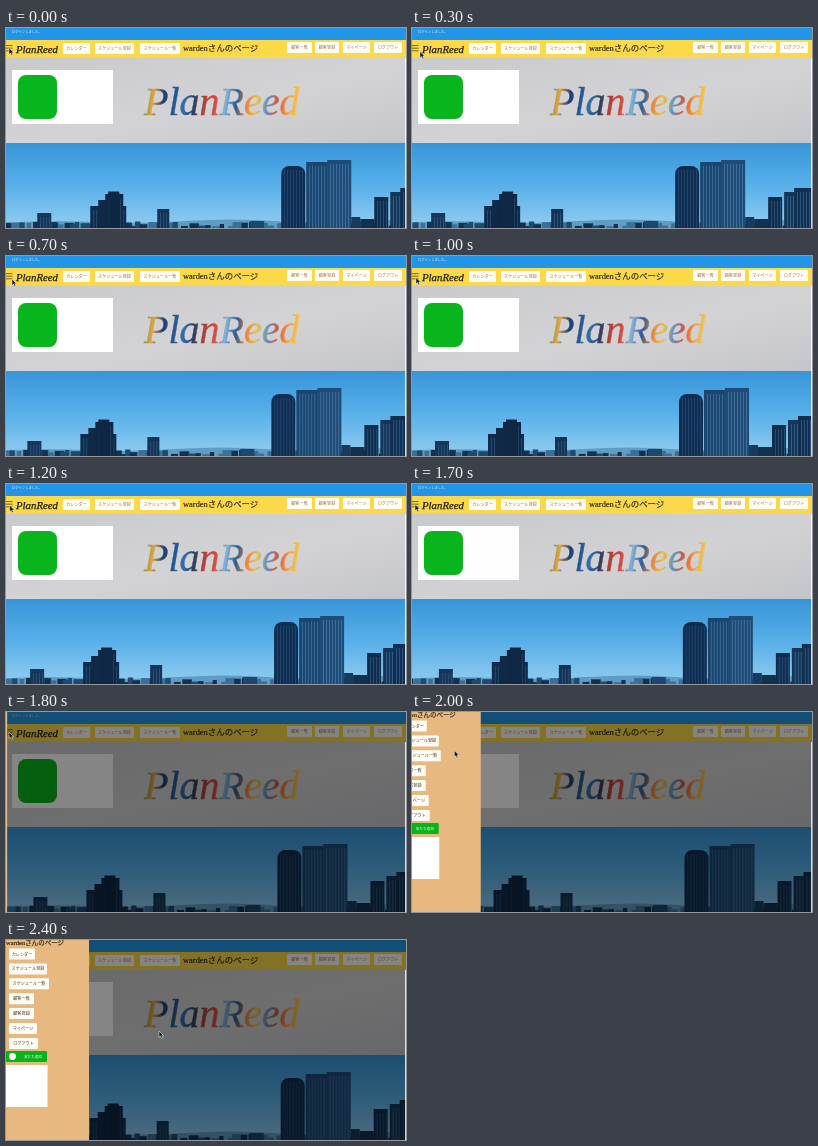
An HTML page that plays this animation: 400 by 200 pixels, repeating every 2.5 s.

```html
<!DOCTYPE html>
<html lang="ja">
<meta charset="utf-8">
<style>
html, body { margin: 0; width: 100%; height: 100%; overflow: hidden; }
svg { display: block; width: 100vw; height: 100vh; }
text { font-family: "Noto Sans CJK JP", "Noto Sans CJK", sans-serif; }
.page { font-family: "Liberation Serif", "Noto Sans CJK JP", "Noto Sans CJK", serif; fill: #2c2412; stroke: #2c2412; stroke-width: .15; }
.brand { font-family: "Liberation Serif", serif; font-style: italic; }
</style>
<svg viewBox="0 0 400 200">
  <defs>
    <linearGradient id="sky" x2="0" y2="1">
      <stop stop-color="#3795d8"/><stop offset=".5" stop-color="#58b0e9"/><stop offset="1" stop-color="#92cdf0"/>
    </linearGradient>
    <linearGradient id="wall" x2="1" y2="1">
      <stop stop-color="#c9cacc"/><stop offset=".55" stop-color="#d3d3d5"/><stop offset="1" stop-color="#c5c6ca"/>
    </linearGradient>
    <linearGradient id="ink" gradientUnits="userSpaceOnUse" x1="138" y1="60" x2="292" y2="82"></linearGradient>
  </defs>
  <path fill="#2196e8" d="M0 0H400V12H0z"/>
  <text x="6" y="5.3" font-size="3.3" fill="#d9efff">ログインしました。</text>
  <path fill="url(#wall)" d="M0 29H400V115H0z"/>
  <path fill="#fbd949" d="M0 12H400V29.5H0z"/>
  <path fill="url(#sky)" d="M0 115H400V200H0z"/>
  <g id="city"></g>
  <path stroke="#6b5a1c" stroke-width=".9" d="M0 17.6H6.5M0 20.2H6.5M0 22.8H6.5"/>
  <text class="brand" x="10" y="24.5" font-size="10.8" fill="#221d10" stroke="#221d10" stroke-width=".25">PlanReed</text>
  <g id="nav"></g>
  <text class="page" x="177" y="23" font-size="8.45">wardenさんのページ</text>
  <path fill="#fff" d="M6 42H107V96H6z"/>
  <rect x="12" y="47" width="39" height="44" rx="8" fill="#09b51c"/>
  <text class="brand" x="138" y="86.5" font-size="40" fill="url(#ink)" stroke="url(#ink)" stroke-width=".4">PlanReed</text>
  <path id="shade" d="M0 0H400V200H0z"/>
  <path fill="#fff" d="M399.2 30H400V200H399.2z"/>
  <g id="menu">
    <path fill="#e7b981" d="M0 0H83V200H0z"/>
    <text class="page" x="0" y="5.3" font-size="6.5">wardenさんのページ</text>
    <rect y="111" width="41" height="11" rx="1" fill="#08b31b"/>
    <circle cx="6.5" cy="116.5" r="3.4" fill="#fff"/>
    <text x="18" y="118" font-size="3.6" fill="#fff">友だち追加</text>
    <path fill="#fff" d="M0 125H41.5V167H0z"/>
  </g>
  <path id="cursor" d="M0 0V6.4L1.5 5.1L2.6 7.4L3.8 6.8L2.7 4.7H4.7z" fill="#111" stroke="#fff" stroke-width=".5"/>
</svg>
<script>
const $ = id => document.getElementById(id);
const add = (parent, tag, attrs, text = '') => {
  const el = document.createElementNS('http://www.w3.org/2000/svg', tag);
  for (const k in attrs) el.setAttribute(k, attrs[k]);
  el.textContent = text;
  return parent.appendChild(el);
};
const rect = (parent, x, y, width, height, fill, rx = 0) => add(parent, 'rect', { x, y, width, height, fill, rx });
const clamp = v => Math.max(0, Math.min(1, v));
const smooth = u => u * u * (3 - 2 * u);

function button(parent, x, y, w, label, fill) {
  rect(parent, x, y, w, 11, '#fffdf6', 1);
  add(parent, 'text', { x: x + w / 2, y: y + 7, 'font-size': 4.15, fill, 'text-anchor': 'middle' }, label);
}

const labels = ['カレンダー', 'スケジュール登録', 'スケジュール一覧', '顧客一覧', '顧客登録', 'マイページ', 'ログアウト'];
const navBoxes = [[57, 27], [89, 39], [134, 40], [281, 25], [309, 24], [337, 27], [368, 28]];
const menuWidths = [26, 38, 40, 25, 25, 28, 29];
labels.forEach((label, i) => {
  const [x, w] = navBoxes[i];
  button($('nav'), x, i < 3 ? 15 : 14, w, label, '#a0784a');
  button($('menu'), 3, 8.5 + i * 14.9, menuWidths[i], label, '#4a3a2c');
});

const inks = ['#3a9a5c', '#e8a23c', '#1f3f70', '#24568f', '#2f6fae', '#2b3f63', '#b5403a', '#d9483a',
  '#7fb2d6', '#2b5d95', '#e8823c', '#f0c244', '#5f93c0', '#d8553a', '#f3a04a', '#f0cd4d'];
inks.forEach((c, i) => add($('ink'), 'stop', { offset: i / (inks.length - 1), 'stop-color': c }));

// Distant hills and low roofs
const city = $('city');
add(city, 'path', { d: 'M-20 195Q40 192 80 194T170 193T260 193T420 190V200H-20z', fill: '#5f9cc6' });
let seed = 7;
const rand = () => (seed = seed * 16807 % 2147483647) / 2147483647;
for (let x = -15; x < 410; x += 4 + rand() * 5) {
  const h = 1.5 + rand() * 5;
  rect(city, x, 200 - h, 4 + rand() * 6, h, ['#12304f', '#1f4a70', '#38709b'][rand() * 3 | 0]);
}

// x, width, top, colour, colour of the window strips, corner radius
const towers = [
  [-24, 15, 170, '#0f2a49'],
  [23, 14, 185, '#15365a', '#2c587f'],
  [76, 36, 178, '#102c4d', '#2a5076'],
  [84, 10, 172, '#0f2947'],
  [91, 18, 166, '#0e2745', '#254a6e'],
  [94, 11, 163.5, '#0e2745'],
  [143, 12, 181, '#143455', '#30597f'],
  [236, 14, 193, '#1d476c'],
  [267, 24, 138, '#0f2d50', '#234c75', 8],
  [292, 23, 134, '#1b4670', '#3f71a0'],
  [313, 24, 132, '#1f4b77', '#4677a5'],
  [337, 9, 189, '#173a5e'],
  [346, 14, 191, '#12314f'],
  [360, 14, 169, '#102d4d', '#2b557d'],
  [376, 12, 164, '#143658', '#3c6890'],
  [386, 30, 160, '#102f51', '#32608a']
];
for (const [x, w, top, fill, strip, rx = 0] of towers) {
  rect(city, x, top, w, 220 - top, fill, rx);
  if (strip) for (let i = 3; i < w - 1; i += 3) rect(city, x + i, top + 4, .8, 200 - top, strip);
}

// time, x, y
const path = [[0, 3, 20], [300, 8, 23.5], [700, 6, 23], [1000, 4, 21.5], [1500, 3, 21], [1850, 3, 20], [2300, 153, 91], [2500, 153, 91]];
const shift = (el, x, y = 0) => el.setAttribute('transform', `translate(${x} ${y})`);

function draw(now) {
  const t = now % 2500;
  // The slow pan starts over just after the loop does
  shift(city, 5.5 * ((t + 2400) % 2500 - 900) / 1000);

  const i = path.findIndex(p => p[0] > t);
  const [t0, x0, y0] = path[i - 1], [t1, x1, y1] = path[i];
  const s = smooth((t - t0) / (t1 - t0));
  shift($('cursor'), x0 + (x1 - x0) * s, y0 + (y1 - y0) * s);

  $('shade').setAttribute('opacity', .48 * clamp((t - 1700) / 100));
  shift($('menu'), -83 * (1 - smooth(clamp((t - 1780) / 300))));
  requestAnimationFrame(draw);
}
draw(0);
</script>
</html>
```
